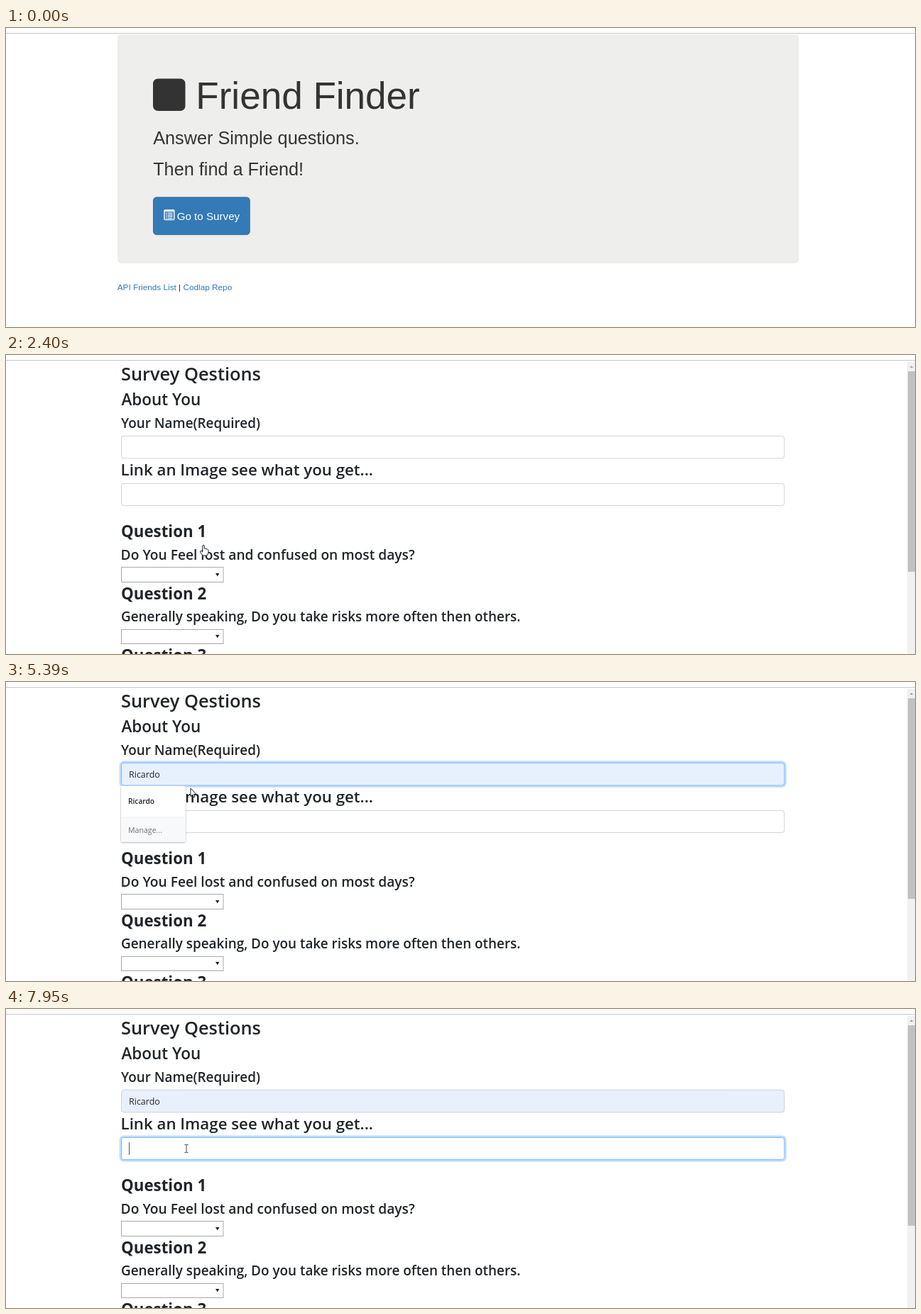
Write an HTML page that moves like this. It is 1280 px wide and 422 px high and loops after 8000 ms.

```html
<!DOCTYPE html>
<html lang="en">
<head>
<meta charset="utf-8">
<title>Survey walkthrough</title>
<style>
  html, body { margin: 0; width: 100%; height: 100%; overflow: hidden; background: #fff; }
  svg { display: block; width: 1280px; height: 422px; }
  text { white-space: pre; }
  #home { font-family: "Liberation Sans", Arial, sans-serif; fill: #333; }
  #survey { font-family: "Open Sans", "Noto Sans", sans-serif; fill: #212529; }
  .head { font-weight: 600; }
  .bold { font-weight: 700; font-size: 22.3px; }
  .label { font-size: 18.9px; }
  .link { fill: #337ab7; }
  .field { fill: #fff; stroke: #ced4da; }
  .ring { fill: none; stroke: #007bff; stroke-opacity: .25; stroke-width: 2.7; }
  .select { fill: #fff; stroke: #a9a9a9; }
  .value { font-size: 12.5px; }
  .cursor { fill: #fff; stroke: #222; stroke-width: 1; stroke-linejoin: round; }
</style>
</head>
<body>
<svg viewBox="0 0 1280 422">
  <defs>
    <filter id="soft" x="-20%" y="-20%" width="140%" height="150%">
      <feDropShadow dx="0" dy="1" stdDeviation="1.3" flood-opacity=".4"/>
    </filter>
  </defs>

  <g id="home">
    <rect x="157" y="9" width="959.5" height="323" rx="5" fill="#eeeeec"/>
    <rect x="207" y="71.5" width="45.5" height="45.5" rx="7"/>
    <text x="267.3" y="113.8" font-size="53.05">Friend Finder</text>
    <text x="207.2" y="163.5" font-size="25.26">Answer Simple questions.</text>
    <text x="207.2" y="208" font-size="25.26">Then find a Friend!</text>
    <rect id="button" x="207.5" y="238.9" width="135.7" height="52.8" rx="4.5"/>
    <rect id="outline" x="207.3" y="238.5" width="136.2" height="53.7" fill="none" stroke="#78a5e6"/>
    <g fill="none" stroke="#fff">
      <rect x="223" y="257" width="13.8" height="13.6" rx="1" stroke-width="1.4"/>
      <path d="M223 258h14" stroke-width="2.4"/>
      <path d="M225 261.4h1.6m1 0h7M225 263.8h1.6m1 0h7M225 266.2h1.6m1 0h7M225 268.6h1.6m1 0h7" stroke-width="1.2"/>
    </g>
    <text x="240.7" y="271" font-size="15.16" fill="#fff">Go to Survey</text>
    <text x="156.7" y="370" font-size="11.79"><tspan class="link">API Friends List</tspan> | <tspan class="link">Codlap Repo</tspan></text>
  </g>

  <g id="survey">
    <g class="head">
      <text x="162" y="35.5" font-size="25.4">Survey Qestions</text>
      <text x="162.4" y="71.3" font-size="22.5">About You</text>
      <text x="162" y="103.3" class="label">Your Name(Required)</text>
      <text x="161.6" y="170.2" font-size="22.25">Link an Image see what you get...</text>
      <text x="161.6" y="289" font-size="19.2">Do You Feel lost and confused on most days?</text>
      <text x="162" y="376.3" class="label">Generally speaking, Do you take risks more often then others.</text>
    </g>
    <g class="bold">
      <text x="162" y="257">Question 1</text>
      <text x="162" y="344.6">Question 2</text>
      <text x="162" y="431.5">Question 3</text>
    </g>

    <rect id="field1" class="field" x="162.5" y="114.3" width="933.5" height="31.6" rx="3.5"/>
    <rect id="field2" class="field" x="162.5" y="181.4" width="933.5" height="31.2" rx="3.5"/>
    <rect id="ring1" class="ring" x="160.9" y="112.7" width="936.7" height="34.8" rx="5"/>
    <rect id="ring2" class="ring" x="160.9" y="179.8" width="936.7" height="34.4" rx="5"/>
    <text id="name" class="value" x="173" y="135.3">Ricardo</text>
    <path id="caret" d="M0 0v18" stroke="#555"/>

    <rect id="select1" class="select" x="162.5" y="299.5" width="143.5" height="21"/>
    <rect class="select" x="162.5" y="387.5" width="143.5" height="20"/>
    <path d="M295 308h5.4l-2.7 4.6zM295 395h5.4l-2.7 4.6z"/>

    <g id="popup">
      <g filter="url(#soft)"><rect x="162" y="146.8" width="90.7" height="78.6" rx="2" fill="#fff"/></g>
      <path d="M162 191h90.7v34.4H162z" fill="#f8f9fa"/>
      <path d="M162 191h90.7" stroke="#eceef0"/>
      <text x="172" y="172" font-size="10.2" font-weight="600">Ricardo</text>
      <text x="172" y="212.5" font-size="10.6" fill="#6b7075">Manage...</text>
    </g>

    <g id="tip" opacity=".3">
      <rect x="260.5" y="202.5" width="110.5" height="16" fill="#fff" stroke="#999" filter="url(#soft)"/>
      <text x="264" y="214" font-size="9.5" fill="#666">Please fill out this field.</text>
    </g>
    <rect id="menu" x="261.5" y="196.5" width="199.5" height="240" fill="#fff" stroke="#bababa"/>
    <path id="shade" d="M461.3 200v222" stroke="#8c8c8c" stroke-width="1.8"/>

    <path d="M1269 9h11v413h-11z" fill="#f1f1f1"/>
    <path d="M1270 23h10v283h-10z" fill="#c1c1c1"/>
    <path d="M1272.5 18h5l-2.5-3z" fill="#a3a3a3"/>
  </g>

  <path d="M0 7.5h1280" stroke="#c6c6c6"/>

  <g id="pointer">
    <circle id="click" cx="-1" r="10.2" fill="#fff64a"/>
    <path id="arrow" class="cursor" d="M0 0V11.5L2.7 9.1L4.4 12.8L6.2 12L4.5 8.4H8Z"/>
    <path id="hand" class="cursor" d="M-1.2 1Q0 -.5 1.2 1V5L5.5 6Q7 6.5 7 8V11L5.3 15H-1.2L-4.6 9.8Q-4.5 8 -3 8.6L-1.2 10Z"/>
    <path id="ibeam" d="M-2.5-5.5H-.7L0-5L.7-5.5H2.5M0-5V5M-2.5 5.5H-.7L0 5L.7 5.5H2.5" fill="none" stroke="#444"/>
  </g>
</svg>

<script>
const LOOP = 8000;
const el = id => document.getElementById(id);
const show = (id, on) => el(id).style.display = on ? '' : 'none';
const clamp = v => Math.max(0, Math.min(1, v));

// Pointer hotspot: [time, x, y]
const path = [
  [230, 948, 391], [380, 800, 368], [540, 560, 322], [760, 345, 285], [1000, 278, 268],
  [2790, 278, 268], [3160, 250, 198], [3540, 286, 272],
  [3620, 286, 272], [3850, 290, 311],
  [4080, 290, 311], [4420, 271, 110], [4620, 276, 131.5],
  [5230, 276, 131.5], [5540, 245, 167],
  [5800, 245, 167], [6000, 261, 197],
  [6560, 261, 197], [6630, 260.7, 196],
  [7410, 260.7, 196], [7470, 254, 197]
];
const shapes = [
  [0, ''], [230, 'arrow'], [780, 'hand'], [2790, 'ibeam'], [3020, 'arrow'], [3100, 'ibeam'],
  [3240, 'arrow'], [3400, 'ibeam'], [3700, 'arrow'], [4160, 'ibeam'], [5300, 'arrow'],
  [5920, 'ibeam'], [6630, 'arrow'], [7870, 'ibeam']
];
const clicks = [[1760, 1930], [4770, 4860], [5720, 5800], [6310, 6460], [7870, 7950]];
const inSpan = (t, spans) => spans.some(([a, b]) => t >= a && t < b);

function position(t) {
  const i = path.findIndex(k => k[0] > t);
  if (i === 0) return path[0].slice(1);
  if (i < 0) return path[path.length - 1].slice(1);
  const [t0, x0, y0] = path[i - 1], [t1, x1, y1] = path[i];
  const p = (t - t0) / (t1 - t0);
  return [x0 + (x1 - x0) * p, y0 + (y1 - y0) * p];
}

function focus(n, amount) {
  el('ring' + n).style.opacity = amount;
  const mix = (a, b) => Math.round(a + (b - a) * amount);
  el('field' + n).style.stroke = `rgb(${mix(206, 128)},${mix(212, 189)},${mix(218, 255)})`;
}

function draw(t) {
  const home = t < 2400;
  show('home', home);
  show('survey', !home);

  el('button').style.fill = inSpan(t, [[1760, 1930]]) ? '#204d74' : t < 850 ? '#337ab7' : '#286090';
  el('button').style.stroke = t < 850 ? '#2e6da4' : '#204d74';
  show('outline', t >= 1760);

  const first = clamp((t - 4760) / 100);
  const second = clamp((t - 6310) / 150);
  focus(1, first * (1 - second));
  focus(2, second);

  const filled = t >= 5380;
  el('field1').style.fill = filled ? '#e8f0fe' : '#fff';
  show('name', filled);
  show('popup', inSpan(t, [[4770, 5800]]));
  el('select1').style.stroke = inSpan(t, [[3700, 4160]]) ? '#777' : '#a9a9a9';

  show('caret', inSpan(t, [[4770, 5300], [5800, 6860], [7410, LOOP]]));
  const spot = t < 5800 ? [173.5, 121] : t < 6310 ? [216.8, 121] : [173.5, 188];
  el('caret').setAttribute('transform', `translate(${spot})`);

  show('tip', inSpan(t, [[6630, 6700]]));
  show('menu', inSpan(t, [[6700, 7870]]));
  show('shade', inSpan(t, [[6630, 7870]]));

  const shape = shapes.filter(s => s[0] <= t).pop()[1];
  for (const id of ['arrow', 'hand', 'ibeam']) show(id, id === shape);
  show('click', inSpan(t, clicks));
  el('pointer').setAttribute('transform', `translate(${position(t)})`);
}

const start = performance.now();
function tick() {
  draw((performance.now() - start) % LOOP);
  requestAnimationFrame(tick);
}
tick();
</script>
</body>
</html>
```
